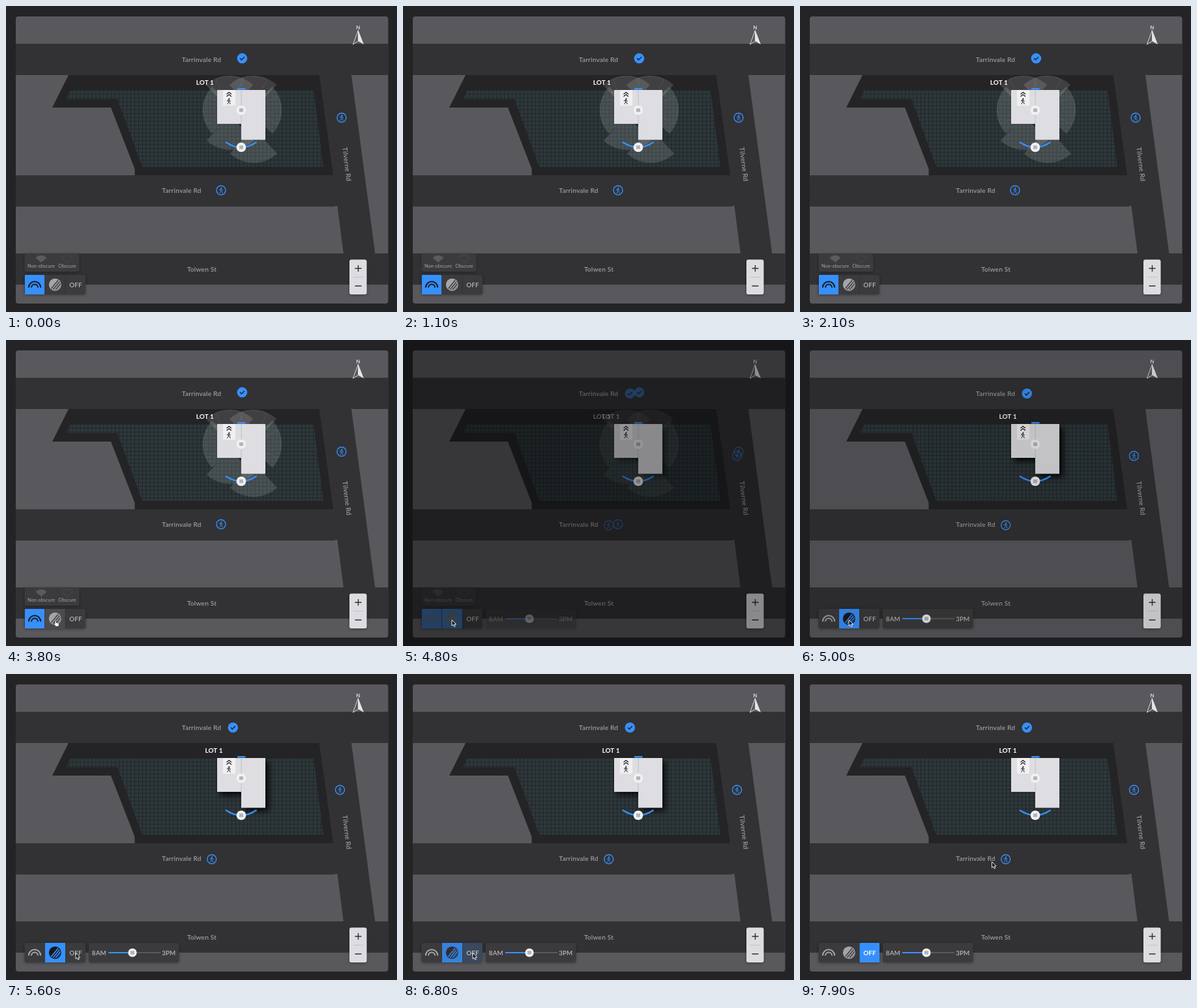
Write an HTML page that moves like this. It is 600 px wide and 470 px high and loops after 8000 ms.

```html
<!DOCTYPE html>
<html lang="en">
<head>
<meta charset="utf-8">
<title>Lot planner</title>
<style>
  html, body { margin: 0; width: 100%; height: 100%; overflow: hidden; background: #242326; }
  svg { display: block; width: 100vw; height: 100vh; }
  text { font-family: Lato, "Open Sans", sans-serif; text-anchor: middle; dominant-baseline: central; }
  .road { font-size: 10.2px; font-weight: 600; fill: #9d9ca0; letter-spacing: .15px; }
  .lot { font-size: 10px; font-weight: 700; fill: #fff; letter-spacing: .1px; }
  .ui { font-size: 9.8px; font-weight: 600; fill: #b9b8bc; letter-spacing: .1px; }
  .legend { font-size: 7.4px; fill: #a09fa3; }
</style>
</head>
<body>
<svg id="stage" viewBox="0 0 600 470"></svg>
<script>
const BLUE = '#3690fc', PANEL = '#3b3a3e', ROAD = '#323134', INK = '#19191d';
const GROUND = '#59585c', PALE = '#a5a4a8', SOFT = 'filter="url(#soft)"';

const rect = (x, y, w, h, fill, r = 0, extra = '') =>
  `<rect x="${x}" y="${y}" width="${w}" height="${h}" rx="${r}" fill="${fill}" ${extra}/>`;
const poly = (points, fill, extra = '') => `<polygon points="${points}" fill="${fill}" ${extra}/>`;
const line = (d, stroke, width = 1, extra = '') =>
  `<path d="${d}" fill="none" stroke="${stroke}" stroke-width="${width}" ${extra}/>`;
const disc = (x, y, r, fill, extra = '') => `<circle cx="${x}" cy="${y}" r="${r}" fill="${fill}" ${extra}/>`;
const label = (x, y, cls, str, extra = '') => `<text x="${x}" y="${y}" class="${cls}" ${extra}>${str}</text>`;
const group = (id, body) => `<g id="${id}">${body}</g>`;
const at = (x, y, body, more = '') => `<g transform="translate(${x} ${y}) ${more}">${body}</g>`;

// Pie slice opening around a facing angle, in degrees clockwise from east
function fan(x, y, r, facing, half, style) {
  const point = a => `${x + r * Math.cos(a * Math.PI / 180)} ${y + r * Math.sin(a * Math.PI / 180)}`;
  return `<path d="M${x} ${y}L${point(facing - half)}A${r} ${r} 0 0 1 ${point(facing + half)}Z" ${style}/>`;
}

const handle = (x, y, r) => disc(x, y, r, '#f1f0f3') +
  line([-2, 0, 2].map(dx => `M${x + dx} ${y - 2.7}v5.4`).join(''), '#6b6a6f', .9);

const walker = (x, y, color) => at(x, y,
  disc(.5, -4, 1.1, color) +
  line('M.2 -2.3L-.3 1L1.7 2.7L2.2 5M-.3 1L-1 3L-2.6 5M-2.6 .2L-2 -1.5L.2 -2.3L1.4 -.4L2.8 .1',
    color, 1.1, 'stroke-linecap="round" stroke-linejoin="round"'), 'scale(.9)');
const walkBadge = (x, y) =>
  disc(x, y, 7, 'none', `stroke="${BLUE}" stroke-width="1.4"`) + walker(x, y, BLUE);
const checkBadge = (x, y) =>
  disc(x, y, 7.8, BLUE) + line(`M${x - 3.3} ${y}l2.4 2.4l4.4 -4.5`, '#222226', 1.5);

const arcIcon = color => line([9.2, 5].map(r => `M${44 - r} 432.5a${r} ${r} 0 0 1 ${2 * r} 0`).join(''), color, 2);
const shadeIcon = (fg, bg) => disc(75.3, 428, 9.5, fg) +
  `<g clip-path="url(#shadeClip)">${
    line([0, 1, 2, 3].map(i => `M${68 + i * 4} 436l13 -16`).join(''), bg, 1.7)}</g>`;

const building = '324,129 398,129 398,205.5 361,205.5 361,181 324,181';
const yard = '99,129 472,129 487,247 209,247 171,143 92,143';

const map =
  rect(15, 16, 571.5, 441, GROUND, 4) +
  [58, 260, 380].map(y => rect(15, y, y === 260 ? 490 : 571.5, 48, ROAD)).join('') +
  poly('481,106 530,106 566.5,381 518,381 508.5,307 500,307 500,255', ROAD) +
  poly('96,106 481,106 502,260 197.5,260 197.5,250 161,156 71,156', '#242326') +
  poly(yard, '#2e383b') + poly(yard, 'url(#grid)') +
  label(300, 81.5, 'road', 'Tarrinvale Rd') + label(269.5, 282.5, 'road', 'Tarrinvale Rd') +
  label(300.5, 403.7, 'road', 'Tolwen St') +
  at(523.5, 243, label(0, 0, 'road', 'Tilverne Rd'), 'rotate(83)');

// Window views: apex inside the house, one reach for all
const views = [[343, 160, -90], [379, 160, -90], [355, 160, 180], [370, 160, 0], [344, 168, 90], [380, 188, 90]]
  .map(([x, y, facing]) => fan(x, y, 53, facing, 43, 'fill="#fff" fill-opacity=".13"') +
    (facing === 90 ? '' : fan(x, y, 52, facing, 24,
      'fill="none" stroke="#858589" stroke-width=".7" stroke-dasharray="2 2" stroke-opacity=".6"')))
  .join('');

const house =
  poly(building, '#dedde1') + rect(333, 129, 19, 24, '#f0eff2') +
  line('M361 130V181', '#a9a8ad', .8, 'stroke-dasharray="2 1"') +
  line('M338.5 135.5l3.7 -3l3.7 3m-7.4 3.5l3.7 -3l3.7 3', INK, 1.2) + walker(342, 146, INK) +
  rect(355, 126, 12.5, 2.5, BLUE) +
  line('M337 209Q361 225 384.5 209', BLUE, 2.4) +
  handle(361, 160, 7.3) + handle(361, 217, 7.3);

const badges = (lotX, check, east, south) =>
  label(lotX, 117, 'lot', 'LOT 1') + checkBadge(...check) + walkBadge(...east) + walkBadge(...south);

const viewUi =
  badges(305.3, [362.4, 80.4], [515, 171.5], [330, 283]) +
  rect(28.5, 380, 84, 28, PANEL, 4, SOFT) +
  fan(54, 394, 11, -90, 50, 'fill="#5b5a5e"') +
  fan(94, 394, 11, -90, 50, 'fill="none" stroke="#5b5a5e" stroke-width=".8" stroke-dasharray="2 1.5"') +
  label(54, 399.5, 'legend', 'Non-obscure') + label(94, 399.5, 'legend', 'Obscure');

const shadeUi =
  badges(319, [348.3, 82.2], [512.5, 178], [315.7, 284.5]) +
  rect(127, 413, 138.5, 30, PANEL, 3, SOFT) +
  label(142.8, 428, 'ui', '8AM') + label(249.8, 428, 'ui', '3PM') +
  line('M157 428H237', GROUND, 1.8) + line('M157 428H194', BLUE, 2.2) + handle(194, 428, 6.6);

const buttons =
  rect(28.5, 413, 93.5, 30, PANEL, 3, SOFT) +
  group('hover', rect(60, 413, 31, 30, '#4b4a4e')) +
  line('M91.3 413V443', '#302f33', .8) +
  arcIcon(PALE) + shadeIcon(PALE, '#454448') + label(107, 428, 'ui', 'OFF') +
  group('pickView', rect(29, 413, 30, 30, BLUE, 1) + arcIcon(INK)) +
  group('pickShade', rect(60, 413, 31, 30, BLUE) + shadeIcon(INK, BLUE)) +
  group('pickOff', rect(91.5, 413, 30.5, 30, BLUE, 1) +
    label(107, 428, 'ui', 'OFF', 'style="fill:#fff;font-weight:700"'));

const compass =
  label(540.5, 33, 'lot', 'N', 'style="font-size:8px;fill:#d5d4d8"') +
  poly('540.5,37 532.5,59 540.5,54', GROUND, 'stroke="#e6e5e8" stroke-width=".9"') +
  poly('540.5,37 549,59 540.5,54', '#e6e5e8');

const zoom =
  rect(527, 389.5, 26.5, 53.5, '#dddce0', 3, SOFT) +
  line('M535.5 403h10M540.5 398v10M535.5 430h10', '#2e2d32', 1.4) + line('M533 416.5h15', '#bbbabf', .8);

const pointer =
  group('arrow', '<path d="M0 0V9L2.1 7.1L3.6 10.4L5.2 9.6L3.8 6.5H6.6Z" fill="#111" stroke="#fff" stroke-width=".9"/>') +
  group('hand', '<path d="M0 1q1 -1.4 2 0v3l3.6 .8q1 .3 .8 1.6l-.7 3.6h-4.2l-3 -3.4q.2 -1.3 1.5 -.5z" fill="#fff" stroke="#222" stroke-width=".7"/>');

document.getElementById('stage').innerHTML = `
  <defs>
    <pattern id="grid" width="5.96" height="5.96" x=".3" y="129" patternUnits="userSpaceOnUse">
      <path d="M0 .5H6M.5 0V6" stroke="#1f2628" stroke-width="1"/>
    </pattern>
    <clipPath id="shadeClip"><circle cx="75.3" cy="428" r="8.5"/></clipPath>
    <filter id="blur" x="-30%" y="-30%" width="160%" height="160%"><feGaussianBlur stdDeviation="4"/></filter>
    <filter id="soft" x="-20%" y="-30%" width="140%" height="160%">
      <feDropShadow dx="0" dy="1" stdDeviation="2" flood-color="#000" flood-opacity=".35"/>
    </filter>
  </defs>` +
  map + group('views', views) +
  group('shadow', at(5, 5, poly(building, '#000', 'filter="url(#blur)" opacity=".85"'))) +
  house + group('viewUi', viewUi) + group('shadeUi', shadeUi) +
  buttons + compass + zoom +
  group('dimmer', rect(0, 0, 600, 470, '#000')) + group('cursor', pointer);

const node = id => document.getElementById(id);
const fade = (id, value) => node(id).setAttribute('opacity', value);
const ramp = (t, from, to) => Math.min(1, Math.max(0, (t - from) / (to - from)));
const smooth = p => p * p * (3 - 2 * p);

function draw(now) {
  const t = Math.floor(now % 8000 / 100) * 100;
  const shade = smooth(ramp(t, 4600, 5000)), off = ramp(t, 6700, 7300);
  const hand = t >= 3500 && t < 4600;

  for (const id of ['views', 'viewUi', 'pickView']) fade(id, 1 - shade);
  for (const id of ['shadow', 'pickShade']) fade(id, shade * (1 - off));
  fade('shadeUi', shade);
  fade('pickOff', off);
  fade('dimmer', .38 * Math.sin(Math.PI * ramp(t, 4550, 5050)));
  fade('hover', +hand);
  fade('hand', +hand);
  fade('arrow', +!hand);

  const enter = ramp(t, 2900, 3500), toOff = ramp(t, 5200, 5600), leave = ramp(t, 7600, 7900);
  const x = 104 - 29 * enter + 32 * toOff + 187.5 * leave;
  const y = 472 - 42 * enter - 1.5 * toOff - 140 * leave;
  node('cursor').setAttribute('transform', `translate(${x} ${y})`);
}

const start = performance.now();
function loop() {
  draw(performance.now() - start);
  requestAnimationFrame(loop);
}
loop();
</script>
</body>
</html>
```
